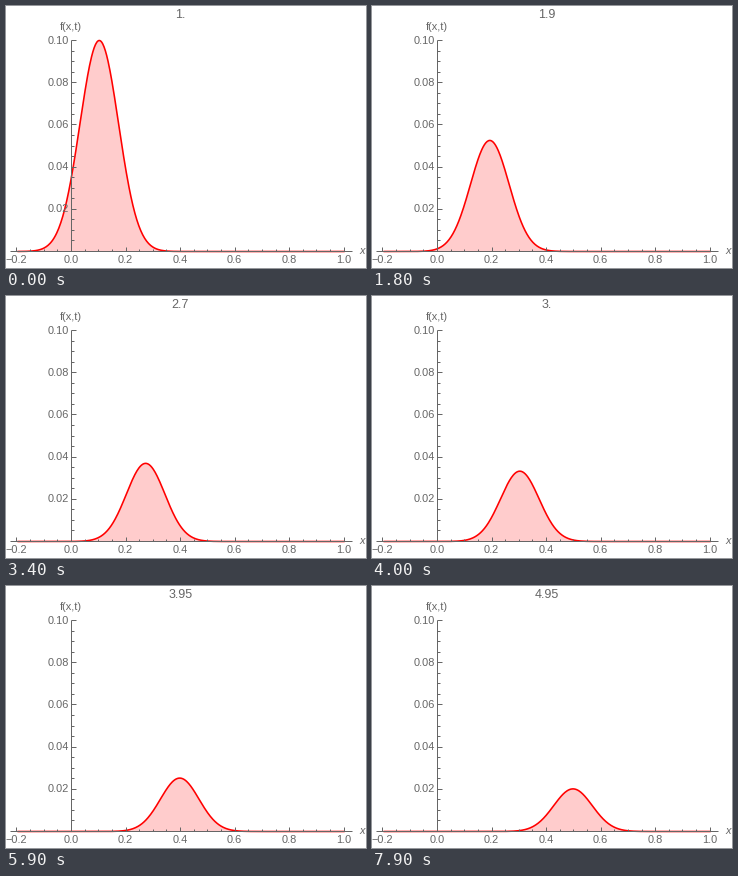
These frames come from a looping animation (360 px wide and 262 px high, 8 s). A matplotlib script:

```python
import numpy as np
import matplotlib.pyplot as plt
from matplotlib.animation import FuncAnimation
from matplotlib.collections import LineCollection
from matplotlib.patches import Polygon

W, H, DPI = 360, 262, 100
FRAMES, INTERVAL = 80, 100
PT = 72 / DPI  # points per pixel
GRAY = "#666666"
X0, Y0 = 65, 245  # pixel holding the axes' crossing
SX, SY = 272.7, 2110  # pixels per data unit

plt.rcParams["font.family"] = "Liberation Sans"
fig = plt.figure(figsize=(W / DPI, H / DPI), dpi=DPI, facecolor="white")
ax = fig.add_axes([0, 0, 1, 1])
ax.set_xlim(0, W)
ax.set_ylim(H, 0)
ax.axis("off")


def label(x, y, text, size=11, ha="center", **kw):
    return ax.text(x, y, text, fontsize=size * PT, color=GRAY,
                   ha=ha, va="baseline", zorder=4, **kw)


def draw_axes():
    segs = [[(4, Y0), (346, Y0)], [(X0, 34), (X0, Y0)]]
    for i in range(-4, 21):
        x, major = X0 + SX * i * 0.05, i % 4 == 0
        segs.append([(x, Y0), (x, Y0 - (4 if major else 2))])
        if major:
            label(x, 257, f"{i * 0.05:.1f}".replace("-", "\u2212"))
    for i in range(1, 21):
        y, major = Y0 - SY * i * 0.005, i % 4 == 0
        segs.append([(X0, y), (X0 + (5 if major else 3), y)])
        if major:
            label(62.5, y + 3.5, f"{i * 0.005:.2f}", ha="right")
    # Snapping moves whole coordinates to pixel centres.
    ax.add_collection(LineCollection(segs, colors=GRAY, linewidths=PT,
                                     zorder=3, snap=True))
    label(65, 24, "f(x,t)")
    label(356.3, 248, "x", style="italic")


xs = np.linspace(-0.2, 1, 500)
X = X0 + 1 + SX * xs
base = Y0 + 0.5
fill = ax.add_patch(Polygon([(0, 0), (1, 0), (1, 1)], facecolor="#ffcccc",
                            edgecolor="none", zorder=1))
curve, = ax.plot([], [], color="red", lw=1.6 * PT, zorder=2,
                 solid_capstyle="butt")
title = label(174.5, 12, "", size=12.5)
draw_axes()


def update(k):
    t = 1 + 0.05 * k
    Y = base - SY * 0.1 / t * np.exp(-100 * (xs - 0.1 * t) ** 2)
    curve.set_data(X, Y)
    fill.set_xy([*zip(X, Y), (X[-1], base), (X[0], base)])
    title.set_text(f"{t:.2f}".rstrip("0"))
    return fill, curve, title


anim = FuncAnimation(fig, update, frames=FRAMES, interval=INTERVAL,
                     repeat=True, repeat_delay=0)
plt.show()
```
